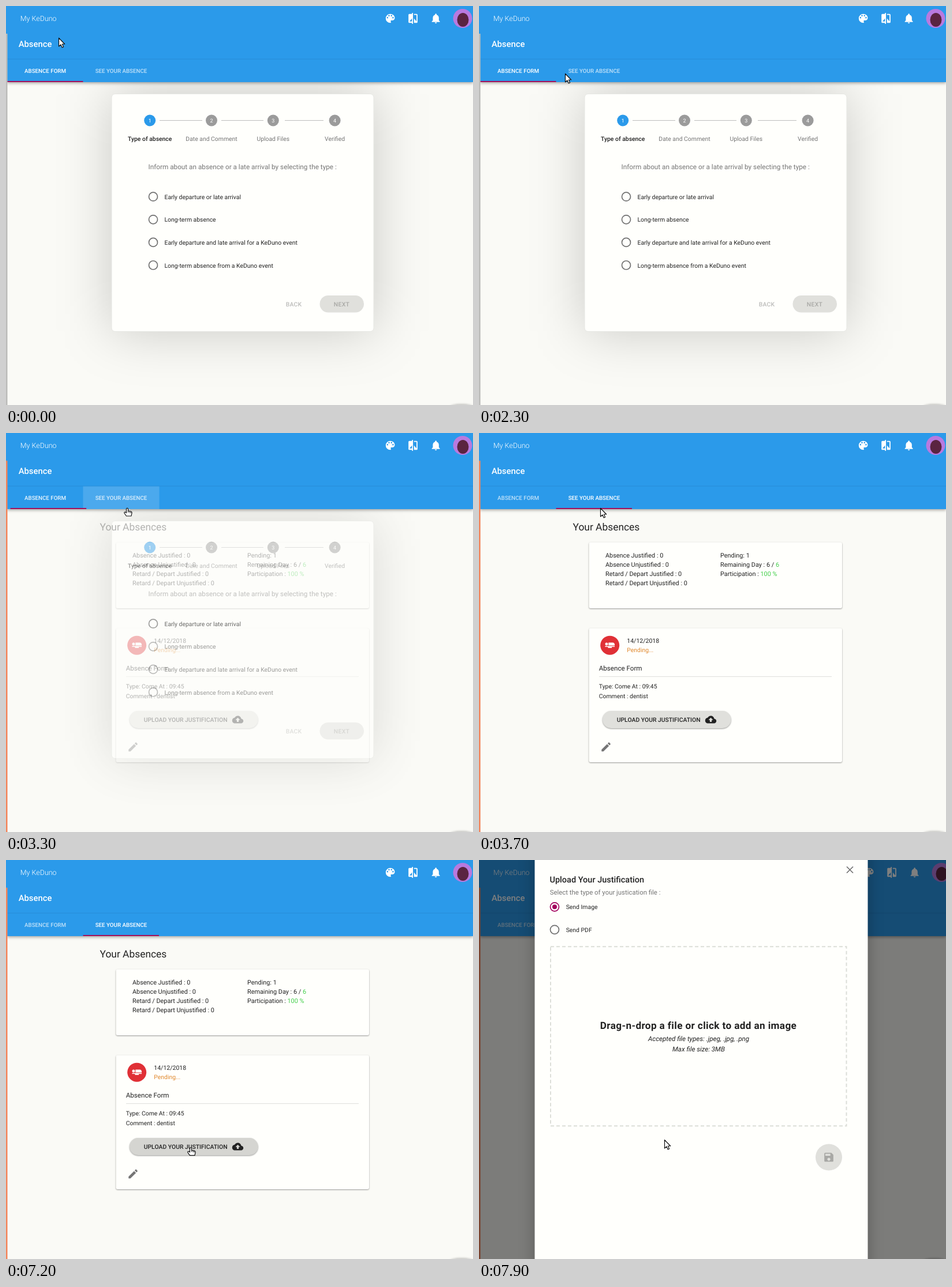
An HTML page for the animation above (8 s loop, 809 by 692 pixels).

```html
<!DOCTYPE html>
<html lang="en">
<head>
<meta charset="utf-8">
<title>Absence form</title>
<style>
html, body { margin: 0; height: 100%; overflow: hidden; background: #fafaf6 }
svg { display: block; width: 809px; height: 692px; font: 10.4px Roboto, sans-serif; text-rendering: geometricPrecision }
text { fill: #222; white-space: pre }
.medium { font-weight: 500 }
.mid { text-anchor: middle }
.tab { font-size: 9.75px; font-weight: 500; fill: #fff }
.stat { font-size: 10.85px }
.gray, .gray text { fill: #757575 }
.green { fill: #43cf4b }
.off { fill: #a8a8a5 }
.paper { fill: #fffffc }
.card { fill: #fffffc; filter: drop-shadow(0 1px 1.3px #0006) }
.radio { fill: none; stroke: #707070; stroke-width: 1.7 }
.on { stroke: #a3005e }
</style>
</head>
<body>
<svg viewBox="0 0 809 692">
  <defs>
    <clipPath id="tabClip"><path d="M133.5 92.5h132V132h-132z"/></clipPath>
  </defs>
  <rect width="809" height="692" fill="#fafaf6"/>
  <ellipse cx="789" cy="695" rx="20" ry="5" fill="#0003" style="filter:blur(1.5px)"/>

  <g id="form">
    <rect x="183" y="152.5" width="454" height="412" rx="6" fill="#0003" style="filter:blur(46px)"/>
    <rect class="paper" x="183" y="152.5" width="454" height="412" rx="6" stroke="#e6e7e3"/>
    <path d="M266 198.5h74M373 198.5h73M483 198.5h67" stroke="#bdbdbd"/>
    <g id="steps"></g>
    <text class="gray" x="246.5" y="283" font-size="11.75">Inform about an absence or a late arrival by selecting the type :</text>
    <g id="options"></g>
    <rect x="543.5" y="502" width="76.5" height="29.5" rx="14.75" fill="#e0e0dc"/>
    <text class="medium mid" x="498.5" y="521" style="fill:#bcbcba" letter-spacing=".2">BACK</text>
    <text class="medium mid off" x="581.5" y="521" letter-spacing=".3">NEXT</text>
  </g>

  <g id="list">
    <text x="162.5" y="169" font-size="17.4">Your Absences</text>
    <rect class="card" x="190.5" y="189.5" width="438.5" height="114.5" rx="3"/>
    <g class="stat">
      <text x="219" y="215.5">Absence Justified : 0</text>
      <text x="219" y="231.5">Absence Unjustified : 0</text>
      <text x="219" y="247.7">Retard / Depart Justified : 0</text>
      <text x="219" y="264">Retard / Depart Unjustified : 0</text>
      <text x="418" y="215.5">Pending: 1</text>
      <text x="418" y="231.5">Remaining Day : 6 / <tspan class="green">6</tspan></text>
      <text x="418" y="247.7">Participation : <tspan class="green">100 %</tspan></text>
    </g>
    <rect class="card" x="190.5" y="338.5" width="438.5" height="232.5" rx="3"/>
    <circle cx="226.7" cy="368.2" r="16.5" fill="#e03036"/>
    <path transform="translate(216.8 357.8) scale(.83)" fill="#fff" d="M22 11v2H9V7h9c2.2 0 4 1.8 4 4zM2 14v2h6v2h8v-2h6v-2zM5 7a3 3 0 1 0 .01 0z"/>
    <text x="256.3" y="364.3" font-size="10.5">14/12/2018</text>
    <text x="256.3" y="380.4" style="fill:#e0872b">Pending...</text>
    <text x="207.8" y="412" font-size="11.6">Absence Form</text>
    <path d="M208 422.5h403" stroke="#dfe0dc"/>
    <text x="207.8" y="443">Type: Come At : 09:45</text>
    <text x="207.8" y="460">Comment : dentist</text>
    <rect id="upload" class="card" x="214" y="482" width="222.5" height="30" rx="15"/>
    <text class="medium" x="238.7" y="501">UPLOAD YOUR JUSTIFICATION</text>
    <path transform="translate(391.8 487.3) scale(.81)" fill="#222" d="M19.35 10.04C18.67 6.59 15.64 4 12 4 9.11 4 6.6 5.64 5.35 8.04 2.34 8.36 0 10.91 0 14c0 3.31 2.69 6 6 6h13c2.76 0 5-2.24 5-5 0-2.64-2.05-4.78-4.65-4.96zM14 13v4h-4v-4H7l5-5 5 5h-3z"/>
    <path class="gray" transform="translate(209.7 534) scale(.87)" d="M3 17.25V21h3.75L17.81 9.94l-3.75-3.75zM20.71 7.04c.39-.39.39-1.02 0-1.41l-2.34-2.34c-.39-.39-1.02-.39-1.41 0l-1.83 1.83 3.75 3.75z"/>
  </g>

  <g id="header">
    <path d="M0 0h809v132H2V48H0z" fill="#2b9aea" style="filter:drop-shadow(0 2px 2.5px #0005)"/>
    <path d="M2 92h807" stroke="#268cd8"/>
    <text x="24.7" y="26" font-size="12.5" font-weight="300" style="fill:#fff">My KeDuno</text>
    <text class="medium" x="21.7" y="71" font-size="14.8" style="fill:#fff">Absence</text>
    <g clip-path="url(#tabClip)"><circle id="ripple" cx="208" cy="122" fill="#fff"/></g>
    <text id="tabForm" class="tab" x="32" y="115.6">ABSENCE FORM</text>
    <text id="tabList" class="tab" x="154.7" y="115.6">SEE YOUR ABSENCE</text>
    <rect id="marker" y="130" width="131.5" height="2" fill="#a3105c"/>
    <g id="tools" fill="#fff">
      <g transform="translate(655.2 11.1) scale(.87)">
        <path d="M12 3a9 9 0 0 0 0 18c.83 0 1.5-.67 1.5-1.5 0-.39-.15-.74-.39-1.01-.23-.26-.38-.61-.38-.99 0-.83.67-1.5 1.5-1.5H16c2.76 0 5-2.24 5-5 0-4.42-4.03-8-9-8z"/>
        <path d="M6.5 10.5h0M9.5 6.5h0M14.5 6.5h0M17.5 10.5h0" stroke="#2b9aea" stroke-width="3" stroke-linecap="round"/>
      </g>
      <path transform="translate(694.6 11.1) scale(.87)" d="M10 3H5c-1.1 0-2 .9-2 2v14c0 1.1.9 2 2 2h5v2h2V1h-2v2zm0 15H5l5-6v6zm9-15h-5v2h5v13l-5-6v9h5c1.1 0 2-.9 2-2V5c0-1.1-.9-2-2-2z"/>
      <path transform="translate(734.2 11.1) scale(.87)" d="M12 22c1.1 0 2-.9 2-2h-4c0 1.1.9 2 2 2zm6-6v-5c0-3.07-1.64-5.64-4.5-6.32V4c0-.83-.67-1.5-1.5-1.5s-1.5.67-1.5 1.5v.68C7.63 5.36 6 7.92 6 11v5l-2 2v1h16v-1z"/>
      <circle cx="791" cy="21.5" r="16.5" fill="#b87adf"/>
      <ellipse cx="791.5" cy="24" rx="10" ry="12" fill="#5a2440"/>
    </g>
  </g>
  <rect id="strip" y="48" width="2.5" height="644"/>

  <g id="dialog">
    <rect width="809" height="692" opacity=".5"/>
    <rect class="paper" x="96.5" y="-30" width="577" height="760" style="filter:drop-shadow(0 10px 13px #0004)"/>
    <text class="medium" x="122.5" y="39" font-size="14.5">Upload Your Justification</text>
    <text class="gray" x="122.7" y="59.5" font-size="11.4">Select the type of your justication file :</text>
    <path d="M637 11.5l11 11m0-11l-11 11" stroke="#707070" stroke-width="1.7"/>
    <circle class="radio on" cx="131" cy="81.3" r="7.5"/>
    <circle cx="131" cy="81.3" r="4" fill="#a3005e"/>
    <text x="150.7" y="85.2">Send Image</text>
    <circle class="radio" cx="131" cy="120.8" r="7.5"/>
    <text x="150.7" y="124.8">Send PDF</text>
    <rect x="124" y="150.3" width="512.5" height="311" fill="none" stroke="#dcded8" stroke-width="2" stroke-dasharray="6 4"/>
    <text class="mid" x="380" y="292.5" font-size="17.2" font-weight="700" letter-spacing=".36">Drag-n-drop a file or click to add an image</text>
    <g class="mid" font-size="11.6" font-style="italic">
      <text x="380.5" y="314">Accepted file types: .jpeg, .jpg, .png</text>
      <text x="380.5" y="331.5">Max file size: 3MB</text>
    </g>
    <circle cx="606" cy="515.5" r="23" fill="#e0e0dc"/>
    <path class="off" transform="translate(595.6 505.1) scale(.87)" d="M17 3H5c-1.1 0-2 .9-2 2v14c0 1.1.9 2 2 2h14c1.1 0 2-.9 2-2V7zm-5 16a3 3 0 1 1 .01 0zm3-10H5V5h10z"/>
  </g>

  <g id="cursor" fill="#fff" stroke="#111" stroke-width="1.2" stroke-linejoin="round">
    <path id="arrow" d="M.5.5V15l3.4-3 2.3 5 2.4-1.1-2.2-4.9h4.3z"/>
    <g id="hand">
      <path d="M-1.5 1.5Q0-.7 1.5 1.5V5l5 1Q8.3 6.4 8 9L7 14H-1.5L-5 9Q-5.5 6.8-3.5 7L-1.5 8.5z"/>
      <path d="M1.5 5v3M4 6v2.5M6 6.5v2.5" stroke-width=".9"/>
    </g>
  </g>
</svg>
<script>
const $ = id => document.getElementById(id);

$('steps').innerHTML = ['Type of absence', 'Date and Comment', 'Upload Files', 'Verified'].map((label, i) => {
  const x = 249.2 + i * 106.8;
  return `<circle cx="${x}" cy="198.5" r="10" fill="${i ? '#9b9b9b' : '#2b9aea'}"/>
    <text class="mid" x="${x}" y="201.8" font-size="9" style="fill:#fff">${i + 1}</text>
    <text class="mid ${i ? 'gray' : 'medium'}" x="${x}" y="233.5">${label}</text>`;
}).join('');

$('options').innerHTML = ['Early departure or late arrival', 'Long-term absence',
  'Early departure and late arrival for a KeDuno event', 'Long-term absence from a KeDuno event'].map((label, i) => {
  const y = 330.7 + i * 39.6;
  return `<circle class="radio" cx="255" cy="${y}" r="7.5"/><text x="274.5" y="${y + 4}">${label}</text>`;
}).join('');

// Pointer path: time, x, y
const path = [
  [0, 91, 55], [300, 91, 55], [400, 88, 52], [600, 70, 44], [800, 35, 48], [1000, 14, 66], [1100, 22, 78],
  [1200, 44, 85], [1300, 66, 87], [1400, 75, 88], [1500, 75, 88], [1600, 98, 78], [1700, 98, 78],
  [2000, 116, 96], [2300, 149, 117], [2400, 149, 117], [2600, 178, 120], [2900, 208, 125], [3100, 211, 129],
  [3300, 210, 130], [4400, 210, 130], [4700, 300, 330], [5000, 386, 495], [5300, 386, 495], [5400, 343, 493],
  [5700, 246, 502], [5900, 250, 505], [6200, 305, 496], [6500, 375, 489], [6900, 322, 496], [7100, 320, 498],
  [7700, 320, 500], [7800, 321, 492], [7900, 321, 485], [8000, 321, 485]
];
const progress = (t, a, b) => Math.min(1, Math.max(0, (t - a) / (b - a)));
const ease = p => p * p * (3 - 2 * p);
const set = (id, attrs) => { for (const k in attrs) $(id).setAttribute(k, attrs[k]); };

function pointer(t) {
  const i = path.findIndex(k => k[0] > t), [t0, x0, y0] = path[i - 1], [t1, x1, y1] = path[i];
  const p = progress(t, t0, t1);
  return [x0 + (x1 - x0) * p, y0 + (y1 - y0) * p];
}

function draw(now) {
  const t = Math.floor(now % 8000 / 100) * 100;   // ten steps per second
  const swap = progress(t, 3250, 3400), slide = ease(progress(t, 3250, 3650)), open = ease(progress(t, 7200, 7600));
  const overUpload = t >= 4900 && t < 7300;
  const hand = (t >= 2400 && t < 3400) || overUpload;

  set('form', { opacity: 1 - swap });
  set('list', { opacity: swap });
  set('tabForm', { opacity: 1 - .3 * swap });
  set('tabList', { opacity: .7 + .3 * swap });
  set('marker', { x: 2 + 131.5 * slide });
  set('ripple', { r: 95 * ease(progress(t, 2700, 3100)), opacity: .2 * (1 - progress(t, 3200, 3600)) });
  set('strip', { fill: t < 2900 ? '#bcbcba' : '#f2855c' });
  $('upload').style.fill = overUpload ? '#d5d5d1' : '#e0e0dc';
  set('tools', { transform: `translate(${open > 0 ? 10 : 0})` });
  set('dialog', { opacity: open });
  set('cursor', { transform: `translate(${pointer(t)})` });
  set('arrow', { opacity: hand ? 0 : 1 });
  set('hand', { opacity: hand ? 1 : 0 });
  requestAnimationFrame(() => draw(performance.now()));
}
draw(performance.now());
</script>
</body>
</html>
```
